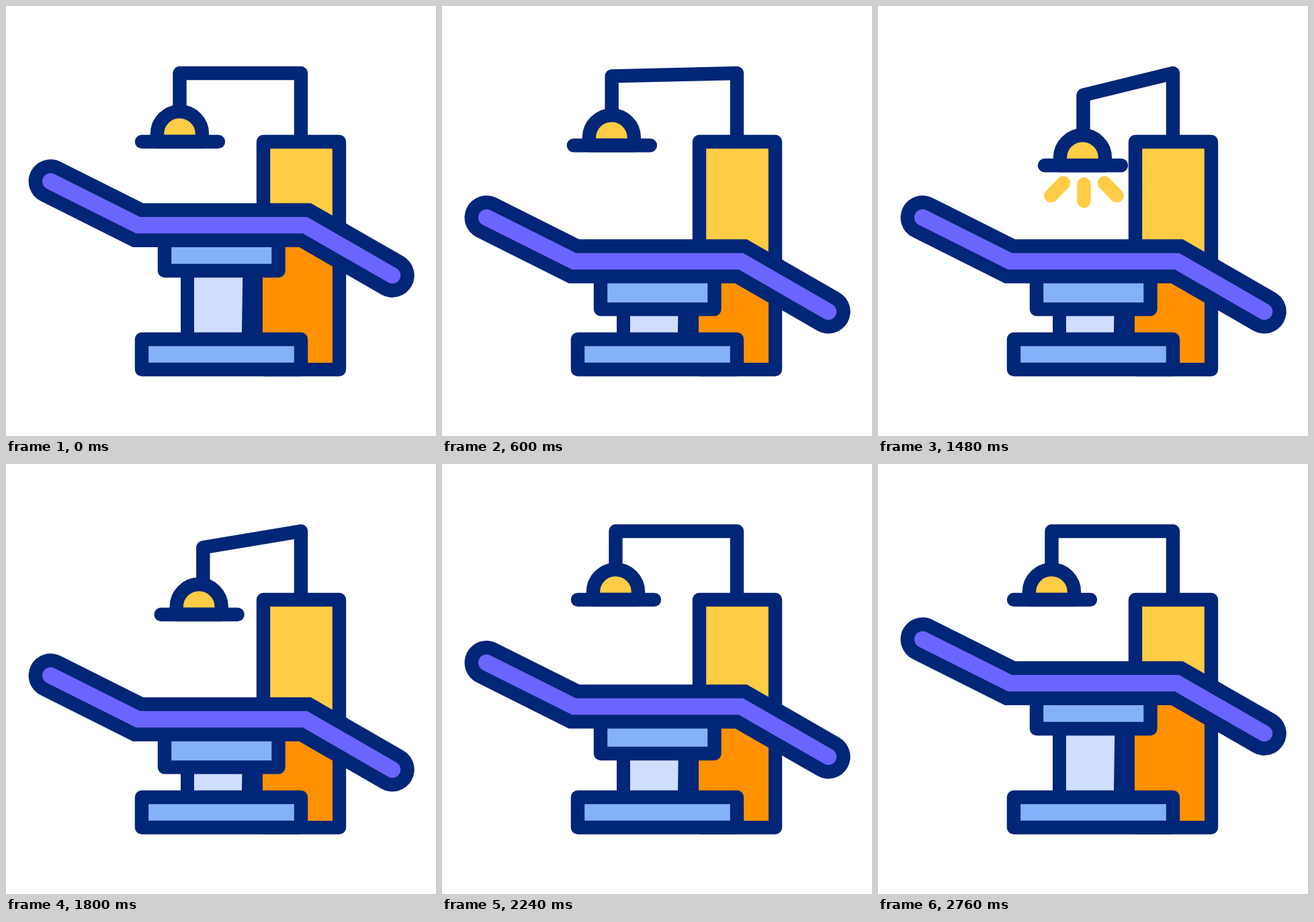
Recreate the animation shown at these times as an HTML page. Size 640 px wide and 640 px high, loop 3.08 s.

```html
<!DOCTYPE html>
<html lang="en">
<head>
<meta charset="utf-8">
<title>Treatment chair</title>
<style>
  html, body { margin: 0; width: 100%; height: 100%; overflow: hidden; background: #fff; }
  svg { display: block; width: 100%; height: 100%; }
  .line { fill: none; stroke: #002677; stroke-width: 20.4; stroke-linejoin: round; stroke-linecap: round; }
  .dark { fill: #002677; }
  .yellow { fill: #ffcc45; }
  .blue { fill: #84b2f8; }
  .rays { fill: none; stroke: #ffcc45; stroke-width: 20.5; stroke-linecap: round; }
  .bed { fill: none; stroke-linecap: round; stroke-linejoin: miter; }
</style>
</head>
<body>
<svg viewBox="0 0 640 640">
  <rect class="line yellow" x="383" y="202" width="113" height="339"/>
  <rect id="lower" fill="#ff9100" x="382" width="104"/>
  <path id="arm" class="line"/>
  <g id="lamp">
    <path class="line yellow" d="M225 202V190.5A33.5 33.5 0 0 1 292 190.5V202Z"/>
    <path class="line" d="M202 202H316"/>
  </g>
  <path id="rays" class="rays"/>
  <rect class="dark" x="260" y="380" width="122" height="116"/>
  <path fill="#cfddff" d="M280 400H352.3L351 486H280Z"/>
  <rect class="line blue" x="202" y="496" width="237" height="45"/>
  <rect id="seat" class="line blue" x="236" y="340" width="169.5" height="54"/>
  <g id="bed" class="bed">
    <path d="M66.3 261L196.5 326.2H445L575 401" stroke="#002677" stroke-width="65.5"/>
    <path d="M66.3 261L196.5 326.2H445L575 401" stroke="#6b65ff" stroke-width="24.5"/>
  </g>
</svg>
<script>
const LOOP = 3080, STEP = 40, DEPTH = 53.8;
const [lower, arm, lamp, rays, seat, bed] =
  ["lower", "arm", "lamp", "rays", "seat", "bed"].map(id => document.getElementById(id));

// Eased progress from 0 to 1 between two times.
function ramp(t, from, to) {
  const p = Math.min(1, Math.max(0, (t - from) / (to - from)));
  return p * p * (3 - 2 * p);
}
const mix = (a, b, p) => a + (b - a) * p;
const move = (node, x, y) => node.setAttribute("transform", `translate(${x} ${y})`);

// Three rays fan out below the lamp, then vanish from the inside.
function flash(t, start, x, y) {
  const tip = ramp(t, start, start + 160);
  const tail = ramp(t, start + 190, start + 370);
  if (tip <= tail) return "";
  const point = (side, p) => {
    const lift = Math.abs(side);
    return `${x + side * mix(30.5, 49, p)} ${y + mix(-lift * 2, 25 - lift * 8, p)}`;
  };
  return [-1, 0, 1].map(side => `M${point(side, tail)}L${point(side, tip)}`).join("");
}

function draw(t) {
  const drop = DEPTH * (ramp(t, 0, 490) - ramp(t, 1890, 2760));
  move(bed, 0, drop);
  move(seat, 0, drop * 1.067);
  lower.setAttribute("y", 335 + drop);
  lower.setAttribute("height", 196 - drop);

  // The lamp swings left, then right, then home a little ahead of the arm.
  const across = ramp(t, 1000, 1380);
  const left = ramp(t, 440, 920) - across;
  const lampRight = across - ramp(t, 1550, 2150);
  const armRight = across - ramp(t, 1600, 2200);
  const lampY = 21 * left + 35.3 * lampRight;
  move(lamp, -23.5 * left + 46 * lampRight, lampY);

  const endX = 258.5 - 22.5 * left + 47 * armRight;
  const endY = 100 + 17 * left + 32.7 * armRight;
  arm.setAttribute("d", `M439 202V100L${endX} ${endY}V${155 + lampY}`);

  rays.setAttribute("d", flash(t, 80, 255, 233) + flash(t, 1320, 306.5, 265.3));
}

const begin = performance.now();
function tick() {
  const t = (performance.now() - begin) % LOOP;
  draw(Math.floor(t / STEP) * STEP);
  requestAnimationFrame(tick);
}
tick();
</script>
</body>
</html>
```
